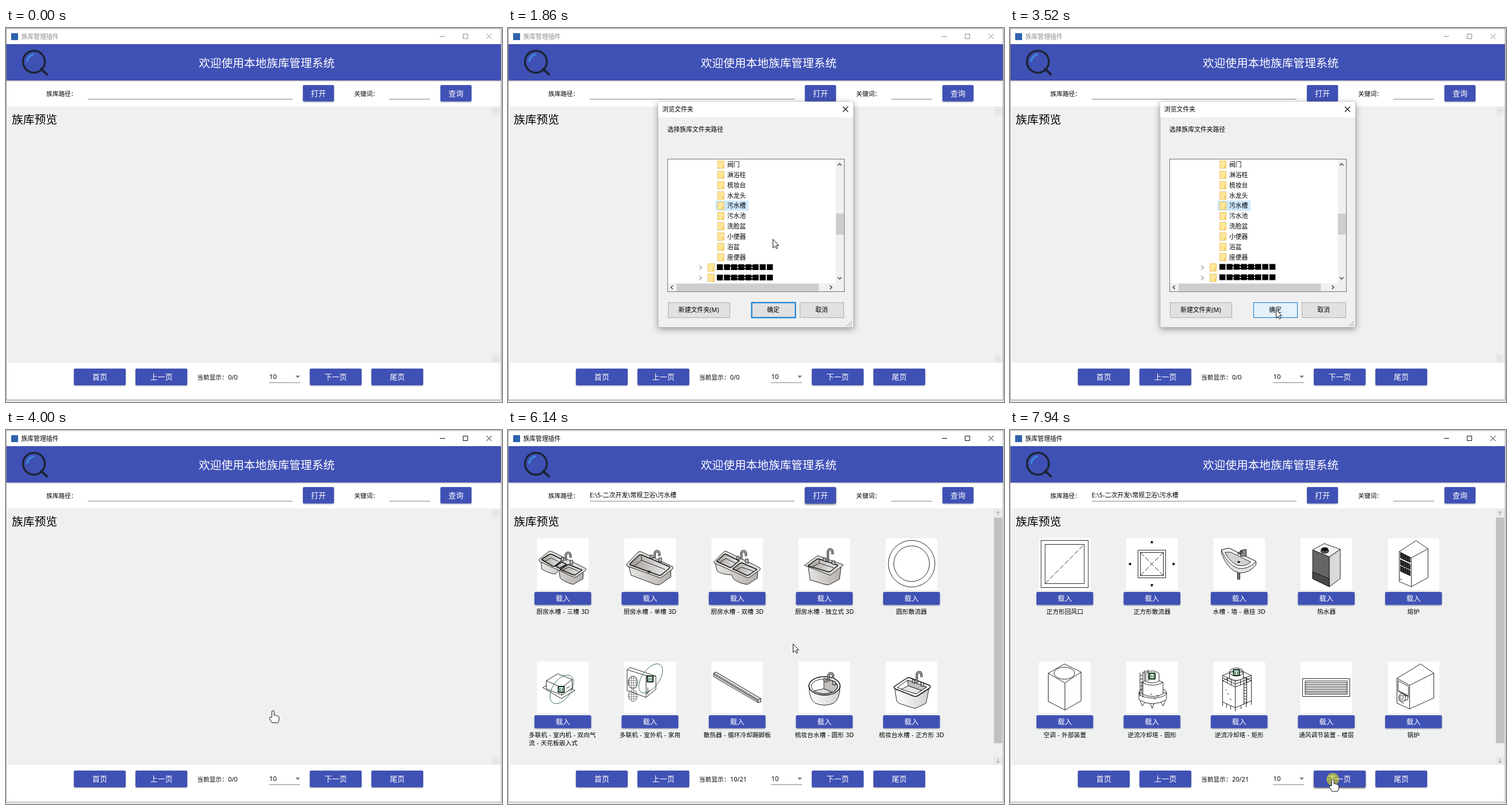
An HTML page that plays this animation: 862 px wide and 649 px high, repeating every 8 s.

```html
<!DOCTYPE html>
<html lang="zh-CN">
<head>
<meta charset="utf-8">
<style>
html, body { margin: 0; width: 100%; height: 100%; overflow: hidden; background: #e6e6e6; }
svg { display: block; width: 862px; height: 649px; }
text { font: 10.7px "Noto Sans", "Noto Sans CJK SC", "Noto Sans CJK", sans-serif; fill: #000; white-space: pre; word-spacing: .6px; }
.mid { text-anchor: middle; }
.btn { fill: #fff; text-anchor: middle; }
.art path, .art ellipse, .art rect { stroke: #111; stroke-width: .9; stroke-linejoin: round; }
</style>
</head>
<body>
<script>
const LOOP = 8000, INDIGO = '#3f51b5';
const rect = (x, y, w, h, fill, more = '') => `<rect x="${x}" y="${y}" width="${w}" height="${h}" fill="${fill}" ${more}/>`;
const line = (d, color, w = 1) => `<path d="${d}" fill="none" stroke="${color}" stroke-width="${w}"/>`;
const text = (x, y, s, size = 10.7, cls = '', more = '') => `<text x="${x}" y="${y}" class="${cls}" style="font-size:${size}px" ${more}>${s}</text>`;
const button = (x, y, w, h, s, size = 13, id = '') =>
  `<g ${id && `id="${id}"`} filter="url(#low)">${rect(x, y, w, h, INDIGO, 'rx="2"')}</g>` +
  text(x + w / 2, y + h / 2 + size * .37, s, size, 'btn');

// Thumbnails, drawn in a 89 by 89 square
const p = (d, fill = '#fff') => `<path d="${d}" fill="${fill}"/>`;
const oval = (x, y, rx, ry, fill = 'none', turn = 0, more = '') =>
  `<ellipse cx="${x}" cy="${y}" rx="${rx}" ry="${ry}" fill="${fill}" transform="rotate(${turn} ${x} ${y})" ${more}/>`;
const box = (x, y, w, h, more = '') => rect(x, y, w, h, 'none', more);
const shell = d => p(d, 'url(#shell)');
const bowl = d => `<path d="${d}" fill="url(#bowl)" style="stroke-width:1.5"/>`;
const faucet = (x, y, h) => {
  const d = `M${x} ${y}v${-h}q1-4 4-4t4 4v5`;
  return p(`M${x - 8} ${y - 1}v-5h4v7zM${x + 7} ${y + 5}v-6h5v7z`, '#bbb') +
    `<path d="${d}" fill="none" style="stroke-width:3.6"/><path d="${d}" fill="none" style="stroke:#ddd;stroke-width:1.3"/>`;
};
const port = (x, y) => rect(x, y, 10, 10, '#c6e6d2', 'style="stroke:#0d2a1a;stroke-width:2"') +
  line(`M${x + 3} ${y + 3}v5M${x + 7} ${y + 3}v5`, '#2a8a50');
const green = 'style="stroke:#3a6b4b"', dash = 'stroke-dasharray="9 3"';

const pages = [[
  ['厨房水槽 - 三槽 3D', shell('M7 41L8 53Q20 61 32 62L38 54 40 69Q50 77 63 80L80 70V55L50 38Z') +
    p('M3 37L20 23Q23 21 26 23L84 52Q86 54 84 56L68 67Q66 68 63 67L4 40Z', '#deddda') +
    bowl('M8 37Q8 36 10 35L21 28Q24 27 26 28L44 37 31 48Q29 49 27 48Z') + bowl('M32 48L43 41 51 45 39 52Z') +
    bowl('M40 54L53 46Q55 45 57 46L78 55 67 63Q65 64 62 63Z') + p('M12 41L24 34 37 40M43 56L55 50 72 57', 'none') + faucet(50, 39, 10)],
  ['厨房水槽 - 单槽 3D', shell('M8 49L12 64 54 80Q60 82 64 79L81 67V53L64 67Z') +
    p('M4 45L24 24Q26 22 29 23L84 49Q86 51 84 53L66 67Q64 69 61 68L5 48Z', '#deddda') +
    bowl('M10 46Q9 45 11 43L26 29Q28 28 31 29L78 49Q80 50 78 52L65 63Q63 65 60 64Z') +
    p('M17 48L30 38 71 54M30 38V30', 'none') + oval(43, 58, 2.5, 1.5, '#222') + faucet(53, 35, 9)],
  ['厨房水槽 - 双槽 3D', shell('M7 44L10 57Q22 64 35 63L39 71Q50 79 63 80L80 69V56L50 40Z') +
    p('M4 41L22 23Q24 21 27 23L84 51Q86 53 84 55L67 67Q65 69 62 68L5 43Z', '#deddda') +
    bowl('M9 40L22 28Q24 27 26 28L48 39 35 50Q33 51 31 50Z') + bowl('M37 53L50 43Q52 42 54 43L79 54 66 63Q64 65 61 64Z') +
    p('M14 42L25 35 42 43M42 56L52 50 73 57', 'none') + faucet(52, 37, 11)],
  ['厨房水槽 - 独立式 3D', shell('M17 50L20 72 46 80Q52 82 56 79L71 71 74 48Z') +
    p('M10 47L33 30 78 46 55 64Z', '#deddda') + bowl('M17 48Q16 47 18 46L32 36Q34 35 36 36L67 46Q69 47 67 48L56 57Q54 59 51 58Z') +
    p('M23 50L36 43 61 51M36 43V36', 'none') + faucet(51, 40, 17)],
  ['圆形散流器', oval(45, 44, 40.5, 40.5) + oval(45, 44, 31, 31)],
  ['多联机 - 室内机 - 双向气\n流 - 天花板嵌入式', p('M10 45L33 32 66 50 42 64Z') + p('M16 33L36 21 61 31V46L43 58 16 47Z') +
    p('M16 33L43 45 61 31M43 45V58', 'none') + oval(43, 48, 28, 16, 'none', -56, green) + port(37, 43) + p('M51 46l6-3M55 50l6-3', 'none')],
  ['多联机 - 室外机 - 家用', p('M5 14L10 10 55 25V48L38 62 5 50Z') + p('M5 14L38 24V62M38 24L55 25', 'none') +
    oval(15, 36, 8, 11, 'url(#mesh)') + oval(15, 59, 8, 10, 'url(#mesh)', 0, 'style="stroke:#777"') +
    oval(46, 29, 29, 15, 'none', -55, green) + port(40, 25) + p('M41 45v12M38 55l7-5', 'none')],
  ['散热器 - 循环冷却踢脚板', p('M4 20L8 18 86 64V70L81 71 4 26Z', '#ddd') + p('M4 20L81 66V71M81 66L86 64M5 23L81 68', 'none')],
  ['梳妆台水槽 - 圆形 3D', p('M18 42Q18 65 29 72Q45 79 61 72Q72 65 72 42Z', 'url(#basin)') +
    oval(45, 42, 27, 16, '#fff', 0, 'style="stroke-width:1.5"') + oval(45, 43, 23, 13, '#fff') +
    p('M44 30Q64 31 68 43Q66 50 58 53L44 47Z', '#c3c0bd') + p('M26 51L44 47 58 53Q42 59 26 51Z', '#e2e0de') + faucet(52, 35, 11)],
  ['梳妆台水槽 - 正方形 3D', p('M16 49L19 68Q21 72 25 73L47 80Q52 82 56 79L70 72 75 47Z', 'url(#basin)') +
    `<path d="M15 43L36 29Q39 27 42 28L76 41Q79 43 76 46L56 59Q53 61 49 60L16 47Q13 45 15 43Z" fill="#fff" style="stroke-width:1.5"/>` +
    p('M20 45L38 32 71 44 53 56Z') + p('M38 32L71 44 62 50 39 42Z', '#c3c0bd') + p('M27 48L39 42 62 50 53 56Z', '#e8e6e4') + faucet(54, 37, 15)]
], [
  ['正方形回风口', box(3.5, 3.5, 82, 82) + box(10.5, 10.5, 68, 68) + `<path d="M10.5 78.5L78.5 10.5" ${dash}/>`],
  ['正方形散流器', box(20.5, 20.5, 48, 48) + box(24.5, 24.5, 40, 40) +
    `<path d="M24.5 64.5l40-40M24.5 24.5l40 40" ${dash} fill="none"/>` +
    p('M44.5 4l2 4h-4zM44.5 84l2-4h-4zM4 44.5l4-2v4zM85 44.5l-4-2v4z', '#000')],
  ['水槽 - 墙 - 悬挂 3D', p('M42 56V71H46V55', '#777') + p('M14 20L27 17 74 40V46Q62 61 45 60Q25 56 14 26Z', '#e2e2e2') +
    p('M14 20L27 17 74 40Q60 55 43 52Q24 46 14 20Z') + p('M20 24L30 24 65 41Q55 50 42 47Q27 40 20 24Z', '#d2d2d2') +
    oval(44, 41, 2, 1.3, '#222') + p('M47 31V21L57 19V31ZM42 25L50 22V26L43 28Z', '#888')],
  ['热水器', p('M21 20L50 32V84L21 70Z', '#656565') + p('M50 32L69 19V70L50 84Z', '#d9d9d9') + p('M21 20L41 9 69 19 50 32Z', '#f0f0f0') +
    p('M21 58L50 70V84L21 70Z', '#484848') + oval(42, 22, 7, 4, '#555') + oval(42, 19, 6, 3, '#111')],
  ['熔炉', p('M20 23L49 4 70 18V68L41 84 20 75Z') + p('M20 23L41 34 70 18M41 34V84', 'none') +
    [25, 37, 48].map(y => p(`M22 ${y}l17 8v9l-17-8z`, 'url(#vent)')).join('') + p('M21 70l4 2', 'none')],
  ['空调 - 外部装置', p('M16 20L44 4 73 18V68L45 84 16 69Z') + p('M16 20L45 37 73 18M45 37V84', 'none') + oval(44, 20, 18, 10.5)],
  ['逆流冷却塔 - 圆形', p('M24 68l4 9 4-6M42 73l3 8 3-8M60 70l4 7 4-9') + p('M22 54V66Q45 80 70 66V54Z') + oval(46, 54, 24, 9) +
    p('M27 36V56Q46 65 64 56V36Q46 25 27 36Z') + p('M27 36Q46 46 64 36', 'none') + p('M34 20V34Q45 40 57 34V20Q45 12 34 20Z') +
    p('M24 19V60M29 17V62M24 24h5M24 30h5M24 36h5M24 42h5M24 48h5M29 20L38 15M32 15v18M38 14v20', 'none') +
    port(40, 20) + line('M42 55l3 3M54 58l2 3M48 64l3 1', '#4053b0')],
  ['逆流冷却塔 - 矩形', p('M16 33L42 22 66 33V68L38 80 16 70Z') + p('M16 33L38 44 66 33M38 44V80', 'none') +
    p('M16 70v7M23 73v7M30 76v7M38 80v6M48 76v6M57 72v7M66 68v7M16 33V24L42 13 66 24V33M16 24L38 34 66 24M16 28L38 39 66 28M24 28v9M31 31v10M38 34v10M47 31v9M57 28v9', 'none') +
    p('M28 18V29Q40 36 52 29V18Z') + oval(40, 18, 12, 7) + port(35, 14) +
    p('M53 30V75M58 28V73M53 40h5M53 45h5M53 50h5M53 55h5M53 60h5M53 65h5M53 70h5', 'none') + line('M24 55l3 2M29 64l2 3M21 48l2 2', '#4053b0')],
  ['通风调节装置 - 楼层', box(3.5, 29.5, 82, 31) + box(8, 33.5, 73, 23) + p('M8 36.5h73M8 39.5h73M8 42.5h73M8 45.5h73M8 48.5h73M8 51.5h73M8 54h73', 'none')],
  ['锅炉', p('M16 29L57 4 80 20V63L38 82 16 72Z') + p('M16 29L38 41 80 20M38 41V82M18 33l18 10v16L18 50ZM17 51l20 10', 'none') +
    oval(25, 62, 6, 7) + oval(24, 62, 3, 4) + p('M27 58l8 2v6l-7 2M19 66l9 7', 'none')]
]];

const tile = ([name, art], i) => {
  const x = i % 5 * 151.5, y = i > 4 ? 214 : 0, rows = name.split('\n');
  const label = rows[1] ? rows.map((s, k) => text(36, 319 + k * 13.7, s)).join('') : text(95.3, 319, name, 10.7, 'mid');
  return `<g transform="translate(${x} ${y})"><g class="art" transform="translate(50.5 188)">` +
    `<rect width="89.5" height="89.5" fill="#fff" style="stroke:none"/>${art}</g>${button(46, 281, 98.5, 22.5, '载入', 12.5)}${label}</g>`;
};
const pageGroup = n => `<g id="page${n}">${pages[n].map(tile).join('')}</g>`;

// Folder dialog
const folder = (x, y) => rect(x + .5, y + .5, 11, 13, '#ffe79a', 'stroke="#e5c365"') + rect(x + 8, y + 8, 4, 6, '#f5d172');
const names = ['阀门', '淋浴柱', '梳妆台', '水龙头', '污水槽', '污水池', '洗脸盆', '小便器', '浴盆', '座便器'];
const blocks = y => [0, 1, 2, 3, 4, 5, 6, 7].map(i => rect(363 + i * 12.4, y, 10.5, 10, '#000')).join('') + line(`M375 ${y + 3}h60M387 ${y + 7.5}h48`, '#000', 2);
const grayButton = (x, w, s, id = '') => rect(x + .5, 476.5, w, 26, '#e1e1e1', `stroke="#adadad" ${id}`) + text(x + w / 2, 493, s, 10.8, 'mid');
const dialog = `<g id="dialog"><g filter="url(#far)">${rect(261, 128, 339.5, 391.5, '#f0f0f0', 'stroke="#999" stroke-width=".6"')}</g>` +
  rect(261, 128, 339, 27, '#fff') + text(268, 145, '浏览文件夹', 10.8) + line('M582 136.5l9 9M591 136.5l-9 9', '#111', 1.1) +
  text(277, 180, '选择族库文件夹路径', 10.8) + rect(277.5, 227.5, 307, 230, '#fff', 'stroke="#6d7078"') +
  rect(361, 299.5, 57, 17.5, '#cce8ff') +
  names.map((s, i) => folder(364, 230 + i * 17.85) + text(381, 241 + i * 17.85, s, 10.8)).join('') +
  folder(347, 408.5) + folder(347, 426.4) + line('M332.5 412l4 3.8-4 3.8M332.5 430l4 3.8-4 3.8', '#999', 1.2) +
  `<g id="blots">${blocks(410)}${blocks(428)}</g>` +
  rect(569.5, 228, 14.5, 215, '#f0f0f0') + rect(570, 322, 13.5, 36.5, '#cdcdcd') +
  rect(278, 443, 306, 14, '#f0f0f0') + rect(293, 443.5, 247, 13, '#cdcdcd') +
  line('M573 238.5l3.3-3.3 3.3 3.3M573 432.5l3.3 3.3 3.3-3.3M286.5 446.7l-3.3 3.3 3.3 3.3M559.5 446.7l3.3 3.3-3.3 3.3', '#444', 1.5) +
  grayButton(278, 107, '新建文件夹(M)') + grayButton(423, 76, '确定', 'id="ok"') + grayButton(507, 76, '取消') +
  [[0, 0], [-3, 0], [-6, 0], [0, -3], [-3, -3], [0, -6]].map(([x, y]) => rect(595 + x, 515 + y, 2, 2, '#bbb')).join('') + '</g>';

const gradient = (id, from, to) => `<linearGradient id="${id}"><stop stop-color="${from}"/><stop offset="1" stop-color="${to}"/></linearGradient>`;

document.body.innerHTML = `<svg viewBox="0 0 862 649"><defs>
<filter id="low" x="-20%" y="-30%" width="140%" height="180%"><feDropShadow dx="0" dy="1" stdDeviation="1" flood-opacity=".38"/></filter>
<filter id="high" x="-20%" y="-30%" width="140%" height="180%"><feDropShadow dx="0" dy="1.3" stdDeviation="1.6" flood-opacity=".75"/></filter>
<filter id="far"><feDropShadow dx="0" dy="3" stdDeviation="6" flood-opacity=".38"/></filter>
${gradient('shell', '#e6e4e2', '#b4b0ad')}${gradient('bowl', '#a19d9a', '#f1f0ef')}${gradient('basin', '#fff', '#d2d0ce')}
<pattern id="mesh" width="4" height="4" patternUnits="userSpaceOnUse"><path d="M0 0H4M0 0V4" style="stroke:#333;stroke-width:1"/></pattern>
<pattern id="vent" width="4" height="3" patternUnits="userSpaceOnUse"><rect width="4" height="3" fill="#111" style="stroke:none"/><path d="M0 1h1.5" style="stroke:#fff;stroke-width:.8"/></pattern>
<clipPath id="view">${rect(2, 136, 842, 445, '#000')}</clipPath></defs>` +
  rect(0, 0, 862, 649, '#e6e6e6') + rect(.5, 1, 860, 644.5, '#fff', 'id="frame" stroke="#999"') +
  rect(9, 9, 12, 12, '#2e62ad') + text(26.5, 18.5, '族库管理插件', 10.8, '', 'id="title"') +
  `<path id="controls" d="M754 14.5h9M794.5 10.5h8v8h-8zM835 10l9 9M844 10l-9 9" fill="none"/>` +
  `<g filter="url(#low)">${rect(1, 28, 859, 63, INDIGO)}</g>` +
  `<circle cx="48.5" cy="58.5" r="19" fill="none" stroke="#1c2536" stroke-width="3.6"/>` +
  `<path d="M61 71l10 9.5" stroke="#1c2536" stroke-width="4" stroke-linecap="round"/>` +
  `<path d="M37 57q2-9 10-11" fill="none" stroke="#3d86dc" stroke-width="3.6" stroke-linecap="round"/>` +
  text(453, 67.5, '欢迎使用本地族库管理系统', 19.7, 'btn') +
  text(70, 117.5, '族库路径：') + text(605, 117.5, '关键词：') + line('M142 123.5H498M666 123.5H737', '#858585') +
  text(142, 117, 'E:\\5-二次开发\\常规卫浴\\污水槽', 10.9, '', 'id="path"') +
  button(516, 99, 54, 28.5, '打开', 13, 'open') + button(755, 99, 54, 28.5, '查询') +
  rect(2, 136, 858, 445, '#eff1f1') +
  `<g clip-path="url(#view)"><g id="list">${text(10, 165.5, '族库预览', 19.8)}${pageGroup(0)}${pageGroup(1)}</g></g>` +
  rect(844, 136.5, 15, 15.5, '#e8e9e9') + rect(844, 566, 15, 15, '#e8e9e9') +
  `<path id="arrows" d="M851.5 148.5V141M848.5 144l3-3 3 3M851.5 570v7.5M848.5 574.5l3 3 3-3" fill="none"/>` +
  rect(844.5, 152, 14.5, 391.5, '#bfc0c0', 'id="thumb"') +
  button(118, 591, 90, 29, '首页') + button(225, 591, 90, 29, '上一页') + button(528, 591, 90, 29, '下一页', 13, 'next') + button(635, 591, 90, 29, '尾页') +
  text(332, 609.5, '当前显示：') + text(386, 609.5, '', 10.9, '', 'id="count"') + text(457.5, 609, '10', 11.3) +
  `<path d="M503 603.3h8l-4 4z" fill="#757575"/>` + line('M457 615.5H511', '#858585') + dialog +
  `<circle id="press" r="11" fill="#ff0" opacity=".5"/><g id="cursor" fill="#fff" stroke="#111" stroke-linejoin="round">
<path id="arrow" d="M.5.5V15.5L4 12.3 6.3 17 8.4 16 6.2 11.4H10.3Z"/>
<path id="hand" d="M-2 11.5V2q0-2 2-2t2 2V8q2.5-1 3.7.7q2.3-.5 3 1.2q1.8 0 1.8 2.3V15q0 3-2 6H-1.5L-6 13.8q-.7-2.3 1.5-2.6z"/></g></svg>`;

// Pointer keys: time, x, y, is a hand
const track = [[390, 773, 625, 0], [780, 610, 270, 0], [960, 501, 135, 0], [1090, 540, 112, 1], [1380, 540, 113, 0],
  [1860, 460, 366, 0], [2080, 460, 366, 0], [2480, 402, 303, 0], [2960, 402, 303, 0], [3270, 447, 504, 0], [3500, 462, 488, 0],
  [3930, 464, 487, 1], [4990, 464, 487, 1], [5060, 468, 475, 0], [5270, 495, 373, 0], [5560, 495, 373, 0], [5610, 495, 370.5, 0],
  [6420, 495, 370.5, 0], [6850, 503, 585, 0], [7050, 561, 606, 1], [LOOP, 561, 606, 1]];
const presses = [[1140, 1240], [2550, 2700], [3600, 3730], [7170, 7310], [7870, LOOP]];
const $ = id => document.getElementById(id);
const show = (id, on) => $(id).style.display = on ? '' : 'none';
const set = (id, key, value) => $(id).setAttribute(key, value);

function draw(t) {
  const within = (a, b) => t >= a && t < b;
  const active = within(1240, 1310) || t >= 3870;
  const loaded = t >= 4460, second = t >= 7380, scroll = within(5340, 6140) ? 27 : 0;
  $('title').style.fill = active ? '#000' : '#8c8c8c';
  set('controls', 'stroke', active ? '#111' : '#8c8c8c');
  set('frame', 'stroke', active ? '#aaa' : '#949494');
  show('path', loaded);
  show('thumb', loaded);
  show('page0', loaded && !second);
  show('page1', second);
  set('arrows', 'stroke', loaded ? '#999' : '#d3d4d4');
  set('list', 'transform', `translate(0 ${-scroll})`);
  set('thumb', 'y', 152 + scroll * 22.5 / 27);
  $('count').textContent = second ? '20/21' : loaded ? '10/21' : '0/0';
  set('open', 'filter', `url(#${within(1040, 1310) || within(4460, 7170) ? 'high' : 'low'})`);
  set('next', 'filter', `url(#${t >= 7050 ? 'high' : 'low'})`);

  const fade = t < 3870 ? Math.min(1, (t - 1240) / 180) : t < 3930 ? .5 : .2;
  show('dialog', within(1310, 4000));
  set('dialog', 'opacity', Math.max(0, fade));
  const hover = t >= 3400;
  set('ok', 'fill', hover ? '#e5f1fb' : '#e1e1e1');
  set('ok', 'stroke', '#0078d7');
  set('ok', 'stroke-width', hover ? 1 : 2);
  set('blots', 'transform', t >= 2960 ? 'translate(1 -.5)' : '');

  show('cursor', t >= 390);
  const i = Math.max(0, track.findIndex((k, n) => n + 1 < track.length && t < track[n + 1][0]));
  const [t0, x0, y0, hand] = track[i], [t1, x1, y1] = track[i + 1];
  const u = Math.max(0, (t - t0) / (t1 - t0));
  const at = `translate(${x0 + (x1 - x0) * u} ${y0 + (y1 - y0) * u})`;
  set('cursor', 'transform', at);
  set('press', 'transform', at);
  show('press', presses.some(([a, b]) => within(a, b)));
  show('hand', hand);
  show('arrow', !hand);
}

let start;
function tick(now) {
  start ??= now;
  draw((now - start) % LOOP);
  requestAnimationFrame(tick);
}
draw(0);
requestAnimationFrame(tick);
</script>
</body>
</html>
```
